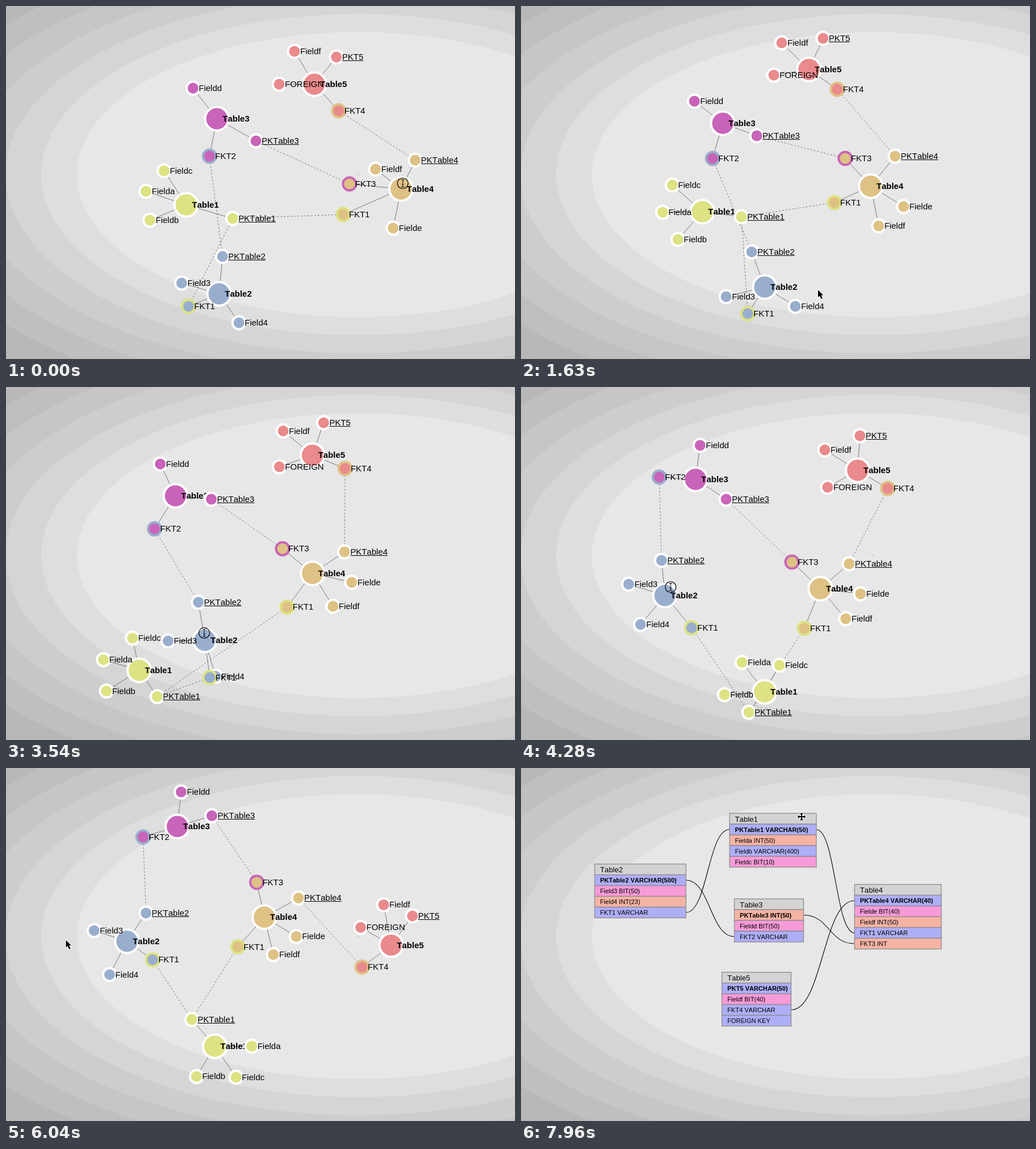
Animation of 898 by 623 pixels, one loop 8000 ms. Source, as an HTML page with a canvas:

```html
<!DOCTYPE html>
<html lang="en">
<head>
<meta charset="utf-8">
<title>Table graph</title>
<style>
  html, body { margin: 0; width: 100%; height: 100%; overflow: hidden; background: #e7e7e7; }
  canvas { display: block; }
</style>
</head>
<body>
<canvas id="stage" width="898" height="623"></canvas>
<script>
const ctx = document.getElementById('stage').getContext('2d');
const LOOP = 8000, STEP = 147.4, LAST_STEP = 54, SCHEMA_STEP = 48;
const FONT = '"Liberation Sans", Arial, sans-serif';
const KEYS = [0, 11, 19, 29, 36, 47];
const YELLOW = '#dde283', BLUE = '#99aecd', PURPLE = '#c864b9', SAND = '#dec184', RED = '#e98a8c';

// Monotone cubic through (times[i], values[i]).
function spline(times, values, t) {
  const last = times.length - 1;
  if (t <= times[0]) return values[0];
  if (t >= times[last]) return values[last];
  const slope = i => (values[i + 1] - values[i]) / (times[i + 1] - times[i]);
  const tangent = i => {
    if (i === 0) return slope(0);
    if (i === last) return slope(last - 1);
    const a = slope(i - 1), b = slope(i);
    return a * b > 0 ? 2 * a * b / (a + b) : 0;
  };
  const i = times.findIndex(time => time > t) - 1;
  const h = times[i + 1] - times[i], u = (t - times[i]) / h, v = 1 - u;
  return values[i] * (1 + 2 * u) * v * v + tangent(i) * h * u * v * v
       + values[i + 1] * u * u * (3 - 2 * u) - tangent(i + 1) * h * u * u * v;
}

// Path from [time, x, y] points.
function path(points) {
  const [times, xs, ys] = [0, 1, 2].map(n => points.map(p => p[n]));
  return t => [spline(times, xs, t), spline(times, ys, t)];
}

// Path that swings around a moving hub, given absolute positions at KEYS.
function orbit(hub, coords) {
  const radii = [], angles = [];
  KEYS.forEach((key, i) => {
    const [hx, hy] = hub(key), dx = coords[2 * i] - hx, dy = coords[2 * i + 1] - hy;
    const turn = 2 * Math.PI;
    let angle = Math.atan2(dy, dx);
    if (i) angle += turn * Math.round((angles[i - 1] - angle) / turn);
    radii.push(Math.hypot(dx, dy));
    angles.push(angle);
  });
  return t => {
    const [hx, hy] = hub(t), r = spline(KEYS, radii, t), a = spline(KEYS, angles, t);
    return [hx + r * Math.cos(a), hy + r * Math.sin(a)];
  };
}

const clusters = [];
function cluster(name, color, hubPoints, fields) {
  const hub = path(hubPoints);
  clusters.push({
    name, color, hub,
    fields: fields.map(([label, ring, ...coords]) => ({ label, ring, at: orbit(hub, coords) }))
  });
}

cluster('Table1', YELLOW,
  [[0, 318, 351], [11, 320, 363], [19, 267, 392], [24, 235, 500], [29, 430, 538], [36, 377, 503], [47, 358, 474]], [
  ['PKTable1', 'white', 400, 375, 389, 372, 334, 403, 402, 574, 320, 484, 368, 410],
  ['Fielda', 'white', 247, 327, 250, 364, 201, 392, 390, 486, 441, 488, 420, 490],
  ['Fieldb', 'white', 254, 378, 277, 412, 235, 449, 359, 543, 351, 559, 306, 512],
  ['Fieldc', 'white', 279, 291, 267, 316, 229, 340, 456, 491, 428, 545, 376, 538]]);
cluster('Table2', BLUE,
  [[0, 376, 508], [11, 430, 496], [19, 430, 502], [29, 254, 368], [36, 223, 316], [47, 200, 293]], [
  ['PKTable2', 'white', 382, 442, 407, 434, 414, 431, 248, 306, 262, 271, 210, 232],
  ['Field3', 'white', 310, 489, 362, 513, 370, 520, 190, 348, 166, 293, 140, 289],
  ['Field4', 'white', 411, 559, 484, 530, 493, 521, 211, 419, 186, 371, 185, 358],
  ['FKT1', YELLOW, 322, 530, 400, 543, 407, 555, 301, 425, 265, 352, 251, 320]]);
cluster('Table3', PURPLE,
  [[0, 372, 199], [11, 356, 207], [19, 290, 208], [29, 308, 163], [36, 284, 118], [47, 368, 82]], [
  ['PKTable3', 'white', 441, 238, 416, 229, 348, 184, 362, 198, 348, 117, 414, 38],
  ['Fieldd', 'white', 330, 145, 306, 168, 240, 168, 316, 103, 307, 61, 322, 43],
  ['FKT2', BLUE, 359, 265, 338, 269, 325, 272, 244, 159, 222, 126, 316, 122]]);
cluster('Table4', SAND,
  [[0, 697, 323], [7, 691, 322], [11, 617, 318], [19, 553, 302], [29, 528, 356], [36, 453, 298], [47, 466, 201]], [
  ['PKTable4', 'white', 722, 272, 660, 265, 614, 270, 579, 312, 503, 253, 538, 223],
  ['Fielde', 'white', 683, 392, 675, 354, 618, 328, 599, 365, 517, 322, 503, 250],
  ['Fieldf', 'white', 652, 288, 631, 388, 576, 365, 573, 409, 484, 360, 450, 263],
  ['FKT1', YELLOW, 595, 368, 553, 347, 492, 342, 500, 426, 414, 354, 404, 247],
  ['FKT3', PURPLE, 606, 314, 572, 269, 499, 260, 478, 309, 419, 246, 509, 151]]);
cluster('Table5', RED,
  [[0, 544, 138], [11, 508, 112], [19, 510, 108], [29, 594, 147], [36, 671, 221], [41, 680, 335], [47, 593, 443]], [
  ['PKT5', 'white', 583, 90, 533, 57, 544, 58, 598, 86, 681, 158, 646, 478],
  ['Fieldf', 'white', 509, 80, 460, 65, 465, 59, 536, 111, 625, 164, 653, 409],
  ['FKT4', SAND, 587, 185, 558, 147, 569, 128, 647, 179, 663, 284, 550, 393],
  ['FOREIGN', 'white', 482, 138, 446, 122, 448, 118, 541, 177, 610, 223, 609, 379]]);

const field = (table, label) => clusters[table - 1].fields.find(f => f.label === label);
const references = [
  [field(2, 'FKT1'), field(1, 'PKTable1')], [field(4, 'FKT1'), field(1, 'PKTable1')],
  [field(3, 'FKT2'), field(2, 'PKTable2')], [field(4, 'FKT3'), field(3, 'PKTable3')],
  [field(5, 'FKT4'), field(4, 'PKTable4')]];

const graphCursor = path([[0, 700, 313], [7, 694, 312], [11, 524, 501], [17, 440, 497],
  [19, 432, 496], [29, 264, 353], [36, 228, 310], [43, -20, 300]]);
const schemaCursor = path([[49, 4, 150], [51, 330, 50], [52, 470, 24], [53, 550, 50], [54, 495, 86]]);

function background() {
  const greys = [184, 191, 198, 205, 213, 222, 231];
  greys.forEach((grey, i) => {
    const rx = 496 + 63 * (6 - i);
    ctx.fillStyle = `rgb(${grey},${grey},${grey})`;
    ctx.beginPath();
    ctx.ellipse(621, 297.5, rx, rx / 1.972, 0, 0, 7);
    ctx.fill();
  });
  ctx.fillStyle = '#999';
  ctx.fillRect(620.5, 296.5, 1.5, 1.5);
}

function text(string, x, y, size, bold) {
  ctx.font = `${bold ? 'bold ' : ''}${size}px ${FONT}`;
  ctx.fillStyle = 'black';
  ctx.fillText(string, x, y);
}

function line(from, to, color) {
  ctx.strokeStyle = color;
  ctx.lineWidth = 1;
  ctx.beginPath();
  ctx.moveTo(...from);
  ctx.lineTo(...to);
  ctx.stroke();
}

function node([x, y], radius, color, ring, label, bold) {
  ctx.beginPath();
  ctx.arc(x, y, radius, 0, 7);
  ctx.fillStyle = color;
  ctx.fill();
  ctx.strokeStyle = ring;
  ctx.lineWidth = 4;
  ctx.stroke();
  text(label, x + 10, y + 5, 15, bold);
  if (label.startsWith('PK')) ctx.fillRect(x + 10, Math.round(y + 6), ctx.measureText(label).width, 1);
}

function drawGraph(t) {
  for (const { hub, fields } of clusters)
    for (const f of fields) line(hub(t), f.at(t), '#777');
  ctx.setLineDash([3, 3]);
  for (const [from, to] of references) line(from.at(t), to.at(t), '#777');
  ctx.setLineDash([]);
  for (const { name, color, hub, fields } of clusters) {
    node(hub(t), 20.7, color, 'white', name, true);
    for (const f of fields) node(f.at(t), 11.5, color, f.ring, f.label);
  }
  if (t >= 43) return;
  const [x, y] = graphCursor(t);
  const pressed = t < 7 || (t >= 17 && t < 34);
  if (pressed) {
    ctx.strokeStyle = 'black';
    ctx.lineWidth = 1.2;
    ctx.beginPath();
    ctx.arc(x, y, 9.5, 0, 7);
    ctx.stroke();
  }
  if (t < 7 || (t >= 24 && t < 34)) beam(x, y); else arrow(x, y);
}

function outlined(points, x, y) {
  ctx.beginPath();
  points.forEach(([px, py]) => ctx.lineTo(x + px, y + py));
  ctx.closePath();
  ctx.strokeStyle = 'white';
  ctx.lineWidth = 2;
  ctx.stroke();
  ctx.fillStyle = 'black';
  ctx.fill();
}

function arrow(x, y) {
  outlined([[0, 0], [0, 13], [3, 10.5], [5.5, 16], [8, 15], [5.5, 9.5], [9.5, 9.5]], x, y);
}

function beam(x, y) {
  line([x, y - 6], [x, y + 6], 'black');
  for (const side of [-1, 1]) {
    line([x - 3, y + 7 * side], [x, y + 6 * side], 'black');
    line([x + 3, y + 7 * side], [x, y + 6 * side], 'black');
  }
  line([x - 1.5, y + 2], [x + 1.5, y + 2], 'black');
}

function moveCursor(x, y) {
  const arm = [[-1, -1], [-1, -4], [-3, -4], [0, -7.5], [3, -4], [1, -4], [1, -1]];
  const points = [];
  for (let turn = 0; turn < 4; turn++)
    for (const [px, py] of arm) {
      const c = [1, 0, -1, 0][turn], s = [0, 1, 0, -1][turn];
      points.push([px * c - py * s, px * s + py * c]);
    }
  outlined(points, x, y);
}

const ROW = 19;
const schema = [
  { x: 368, y: 80, w: 153, rows: ['Table1', 'PKTable1 VARCHAR(50)', 'Fielda INT(50)', 'Fieldb VARCHAR(400)', 'Fieldc BIT(10)'] },
  { x: 130, y: 169.5, w: 161, rows: ['Table2', 'PKTable2 VARCHAR(500)', 'Field3 BIT(50)', 'Field4 INT(23)', 'FKT1 VARCHAR'] },
  { x: 376.5, y: 231, w: 122, rows: ['Table3', 'PKTable3 INT(50)', 'Fieldd BIT(50)', 'FKT2 VARCHAR'] },
  { x: 588.5, y: 205.5, w: 153, rows: ['Table4', 'PKTable4 VARCHAR(40)', 'Fielde BIT(40)', 'Fieldf INT(50)', 'FKT1 VARCHAR', 'FKT3 INT'] },
  { x: 354.5, y: 360.5, w: 122, rows: ['Table5', 'PKT5 VARCHAR(50)', 'Fieldf BIT(40)', 'FKT4 VARCHAR', 'FOREIGN KEY'] }];
// [left table, row, right table, row]
const joins = [[2, 4, 1, 1], [2, 1, 3, 3], [1, 1, 4, 4], [3, 1, 4, 5], [5, 3, 4, 1]];

function rowColor(label, index) {
  if (index === 0) return '#d3d3d3';
  if (label.includes(' INT')) return '#f5b3a4';
  return label.includes(' BIT') ? '#f79bd8' : '#aeaef7';
}

function drawSchema(t) {
  for (const [left, leftRow, right, rightRow] of joins) {
    const a = schema[left - 1], b = schema[right - 1];
    const x1 = a.x + a.w, y1 = a.y + ROW * (leftRow + 0.5);
    const x2 = b.x, y2 = b.y + ROW * (rightRow + 0.5), mid = (x1 + x2) / 2;
    ctx.strokeStyle = 'black';
    ctx.lineWidth = 1.1;
    ctx.beginPath();
    ctx.moveTo(x1, y1);
    ctx.bezierCurveTo(mid, y1, mid, y2, x2, y2);
    ctx.stroke();
  }
  for (const { x, y, w, rows } of schema)
    rows.forEach((label, i) => {
      const top = y + i * ROW;
      ctx.fillStyle = rowColor(label, i);
      ctx.fillRect(x, top, w, ROW);
      ctx.strokeStyle = '#8c8c8c';
      ctx.lineWidth = 1.3;
      ctx.strokeRect(x, top, w, ROW);
      text(label, x + 9.5, top + (i ? 13.5 : 14.5), i ? 11.1 : 13.2, i === 1);
    });
  if (t < 49) return;
  const [x, y] = schemaCursor(t);
  if (t === LAST_STEP) moveCursor(x, y); else arrow(x, y);
}

function render(now) {
  const t = Math.min(LAST_STEP, Math.floor(now % LOOP / STEP));
  background();
  if (t < SCHEMA_STEP) drawGraph(t); else drawSchema(t);
  requestAnimationFrame(render);
}

ctx.fontKerning = 'none';
ctx.fillStyle = '#b8b8b8';
ctx.fillRect(0, 0, 898, 623);
render(0);
</script>
</body>
</html>
```
